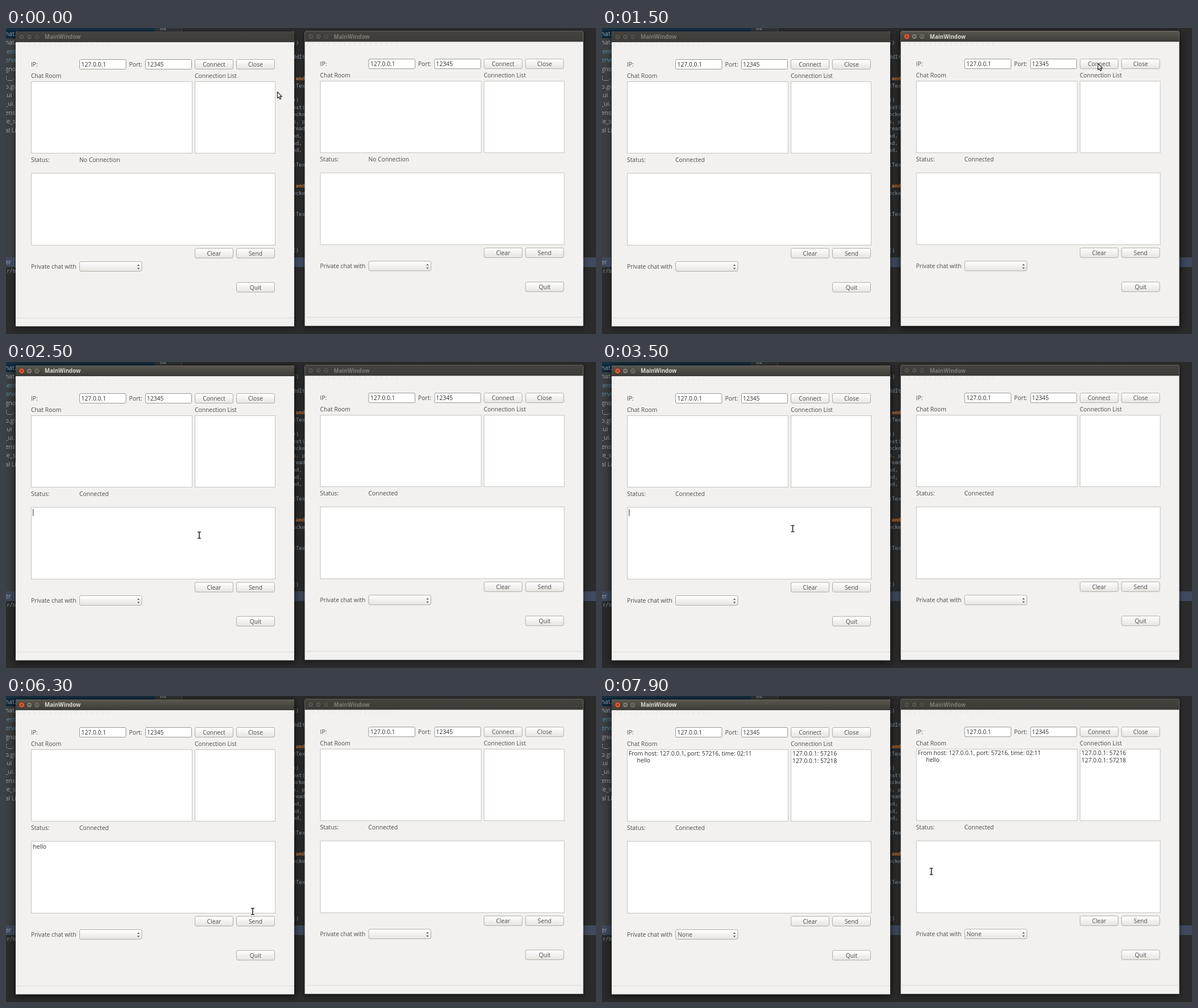
An HTML page that plays this animation: 1038 px wide and 539 px high, repeating every 8 s.

```html
<!DOCTYPE html>
<html lang="en">
<head>
<meta charset="utf-8">
<title>Chat windows</title>
<style>
html, body { margin: 0; width: 100%; height: 100%; overflow: hidden; background: #2b2b2b; }
svg { display: block; width: 100%; height: 100%; }
text { font: 10.3px "Open Sans", "Noto Sans", sans-serif; fill: #4c4c4c; white-space: pre; }
.mid { text-anchor: middle; }
.ink { fill: #2e2e2e; }
.title { font-size: 9.7px; font-weight: 700; fill: #807d76; }
.side { font-size: 10.6px; fill: #a3a8ab; }
.blue { fill: #5c93b3; }
.code { font: 9px "DejaVu Sans Mono", monospace; fill: #8d98a4; }
.kw { fill: #cc7832; }
.bold { font-weight: 700; }
.box { fill: #fff; stroke: #c6c2bd; }
.field { fill: #fff; stroke: #9b9791; }
.btn { fill: url(#btn); stroke: #b3aea8; }
.bar { fill: url(#barOff); }
.knob { fill: #55534e; stroke: #2f2e2b; stroke-width: .8; }
.sign { fill: none; stroke: #34332f; stroke-width: 1; }
.shadow { filter: url(#soft); opacity: .45; }
.active .bar { fill: url(#barOn); }
.active .title { fill: #dfdbd2; }
.active .knob { fill: #7b786f; }
.active .close { fill: #e9592c; }
.shadow.active { filter: url(#wide); opacity: .7; }
</style>
</head>
<body>
<svg id="stage" viewBox="0 0 1038 539" preserveAspectRatio="none">
  <defs>
    <linearGradient id="barOn" x2="0" y2="1"><stop stop-color="#5b584f"/><stop offset="1" stop-color="#3c3b37"/></linearGradient>
    <linearGradient id="barOff" x2="0" y2="1"><stop stop-color="#45433e"/><stop offset="1" stop-color="#3c3b37"/></linearGradient>
    <linearGradient id="btn" x2="0" y2="1"><stop stop-color="#fff"/><stop offset="1" stop-color="#e6e4e1"/></linearGradient>
    <filter id="soft" x="-20%" y="-20%" width="140%" height="140%"><feGaussianBlur stdDeviation="4"/></filter>
    <filter id="wide" x="-20%" y="-20%" width="140%" height="140%"><feGaussianBlur stdDeviation="7"/></filter>
  </defs>
  <g id="desk"></g>
  <g id="shadows"></g>
  <g id="windows"></g>
  <g id="pointer">
    <path id="arrow" d="M0.5 0.5V11.6L3 9.3L4.9 13.5L6.8 12.6L5 8.6H8.4Z" fill="#fff" stroke="#1c1c1c" stroke-width="1.1" stroke-linejoin="round"/>
    <g id="beam" fill="none">
      <path d="M-3 -5.5H3M0 -5.5V5.5M-3 5.5H3" stroke="#fff" stroke-width="3.4"/>
      <path d="M-3 -5.5H3M0 -5.5V5.5M-3 5.5H3" stroke="#333" stroke-width="1.7"/>
    </g>
  </g>
</svg>
<script>
const LOOP = 8000, STEP = 100;
const SHIFT = [508.6, -0.8];
const $ = id => document.getElementById(id);

const text = (x, y, s, cls = '', id = '') =>
  `<text x="${x}" y="${y}" class="${cls}"${id && ` id="${id}"`}>${s}</text>`;
const rect = (x, y, w, h, cls, r = 0) =>
  `<rect x="${x}" y="${y}" width="${w}" height="${h}" rx="${r}" class="${cls}"/>`;
const fill = (x, y, w, h, color) =>
  `<rect x="${x}" y="${y}" width="${w}" height="${h}" fill="${color}"/>`;
const button = (x, y, s) =>
  rect(x, y, 67, 17, 'btn', 2.5) + text(x + 33.5, y + 12.5, s, 'mid');

// Code editor behind the two windows
function desk() {
  const files = ['hat.p', 'hat.', 'ient', 'erve', 'gnor', 't__.', 'o.gi', '.ui', '_ui.', 'ensh', 'le_s', 'al Lib'];
  const code = [
    [26, '()'], [51, 'ddIt'], [102, 'tText'], [127, '))'], [140, 'ext('], [152, 'ocke'],
    [165, 'o<tspan class="kw">,</tspan> p'], [177, 'read'],
    ...[190, 203, 215].map(y => [y, 'ad<tspan class="kw">,</tspan>']),
    [241, 'tTex'], [291, 'ocke'], [328, 'tTex'], [392, '()']
  ];
  return fill(0, 0, 1038, 539, '#2b2b2b') +
    fill(0, 0, 262, 404, '#3c3f41') + fill(0, 3, 262, 15, '#0d293e') + fill(0, 0, 262, 4, '#17303f') +
    fill(262, 0, 47, 404, '#313335') + fill(309, 0, 1, 404, '#45484a') + fill(985, 0, 1, 404, '#393939') +
    text(271, 4, '64', 'code') +
    fill(0, 404, 1038, 17, '#3f4a5e') + fill(13, 404, 1, 17, '#56627a') +
    files.map((s, i) => text(-1.5, 14 + i * 15.42, s, 'side' + (i == 2 || i == 3 ? ' blue' : ''))).join('') +
    text(-1.5, 416, 'er', 'side') + text(-4.5, 431, 'sr/b', 'code') +
    code.map(([y, s]) => text(504.5, y + 3, s, 'code')).join('') +
    [89, 278].map(y => text(509.5, y + 3, 'and', 'code kw bold')).join('');
}

function frame(k) {
  let dots = '';
  for (let x = 22; x < 180; x += 9.2) dots += `M${x} 28h1.4m-1.4 3h1.4`;
  return `<g id="win${k}" transform="translate(${SHIFT[0] * k} ${SHIFT[1] * k})">` +
    '<path d="M17 525.5V9q0-3 3-3H504q3 0 3 3V525.5Z" fill="#f2f1f0"/>' +
    '<path d="M17 25V9q0-3 3-3H504q3 0 3 3V25Z" class="bar"/>' +
    '<circle cx="27.6" cy="15.7" r="5" class="knob close"/>' +
    '<circle cx="41" cy="15.7" r="5" class="knob"/><circle cx="54.3" cy="15.7" r="5" class="knob"/>' +
    '<path class="sign" d="M25.7 13.8l3.8 3.8m0-3.8l-3.8 3.8M38.6 15.7h4.8M52.3 13.9h4v3.6h-4Z"/>' +
    text(68, 19.4, 'MainWindow', 'title') +
    `<path d="${dots}" stroke="#d9d7d4"/>` +
    text(44, 68, 'IP:') + rect(129.5, 55.5, 81.5, 17, 'field', 2) + text(132.5, 68, '127.0.0.1', 'ink') +
    text(216.5, 68, 'Port:') + rect(245.5, 55.5, 81, 17, 'field', 2) + text(248, 68, '12345', 'ink') +
    button(332.5, 55.5, 'Connect') + button(405.5, 55.5, 'Close') +
    text(44, 87.5, 'Chat Room') + text(332, 87.5, 'Connection List') +
    rect(44.5, 94.5, 283, 126, 'box') + rect(332.5, 94.5, 141, 126, 'box') +
    text(44, 235.5, 'Status:') + text(129, 235.5, '', '', 'status' + k) +
    rect(44.5, 256, 429, 126.5, 'box') +
    button(332.5, 388.2, 'Clear') + button(405.5, 388.2, 'Send') +
    text(44, 424, 'Private chat with') + rect(129.5, 411.5, 109.5, 17, 'btn', 2.5) +
    '<path d="M230.8 419L233 416.2L235.2 419ZM230.8 422.5L233 425.3L235.2 422.5Z" fill="#5a5a5a"/>' +
    button(405.5, 448.2, 'Quit') +
    '<path d="M17 510.5H507" stroke="#dddbd9"/>' +
    `<g id="sent${k}">` +
    text(47, 105, 'From host: 127.0.0.1, port: 57216, time: 02:11', 'ink') + text(61.5, 117, 'hello', 'ink') +
    text(335, 105, '127.0.0.1: 57216', 'ink') + text(335, 118.2, '127.0.0.1: 57218', 'ink') +
    text(133, 424, 'None') + '</g>' +
    (k ? '' : text(47.5, 269, '', 'ink', 'typed') + '<rect id="caret" y="259" width="1" height="12" fill="#222"/>') +
    '</g>';
}

$('desk').innerHTML = desk();
$('shadows').innerHTML = [0, 1].map(k =>
  `<rect id="shade${k}" class="shadow" x="${16 + SHIFT[0] * k}" y="8" width="492" height="520"/>`).join('');
$('windows').innerHTML = frame(0) + frame(1);

// Pointer path: time, x, y
const path = [
  [0, 477, 112], [400, 372, 62], [600, 372, 62], [900, 606, 90], [1300, 872, 62], [1500, 872, 62],
  [2100, 427, 298], [2400, 340, 305], [2800, 340, 305], [3100, 335.5, 293.5], [5300, 335.5, 293.5],
  [5700, 412, 334], [5800, 412, 334], [6300, 434, 379.5], [6500, 446, 398], [6900, 446, 398],
  [7400, 438, 341], [7500, 438, 341], [7900, 579.5, 309], [LOOP, 579.5, 309]
];
const keys = [3900, 4000, 4300, 4400, 4600];
const blinks = [[2500, 2900], [3500, 5000], [5400, 5900]];

function pointerAt(t) {
  const i = path.findIndex(p => p[0] > t);
  const [t0, x0, y0] = path[i - 1], [t1, x1, y1] = path[i];
  const f = (t - t0) / (t1 - t0);
  return [x0 + (x1 - x0) * f, y0 + (y1 - y0) * f];
}

function overText(x, y) {
  const u = x > 520 ? x - SHIFT[0] : x;
  return u > 44 && (u < 474 && y > 256 && y < 383 || u < 328 && y > 94 && y < 221);
}

const show = (el, on) => el.setAttribute('visibility', on ? 'visible' : 'hidden');

function draw(now) {
  const t = Math.floor(now % LOOP / STEP) * STEP;
  const active = t < 500 ? -1 : t < 1400 ? 0 : t < 2400 ? 1 : 0;
  const done = t >= 6600;
  [0, 1].forEach(k => {
    $('win' + k).classList.toggle('active', k === active);
    $('shade' + k).classList.toggle('active', k === active);
    $('status' + k).textContent = t >= [600, 1500][k] ? 'Connected' : 'No Connection';
    show($('sent' + k), done);
  });

  const typed = $('typed');
  typed.textContent = done ? '' : 'hello'.slice(0, keys.filter(at => t >= at).length);
  $('caret').setAttribute('x', 47.3 + typed.getComputedTextLength());
  show($('caret'), blinks.some(([a, b]) => t >= a && t < b));

  const [x, y] = pointerAt(t), beam = overText(x, y);
  $('pointer').setAttribute('transform', `translate(${x} ${y})`);
  show($('beam'), beam);
  show($('arrow'), !beam);
}

const start = performance.now();
function tick() {
  draw(performance.now() - start);
  requestAnimationFrame(tick);
}
tick();
</script>
</body>
</html>
```
